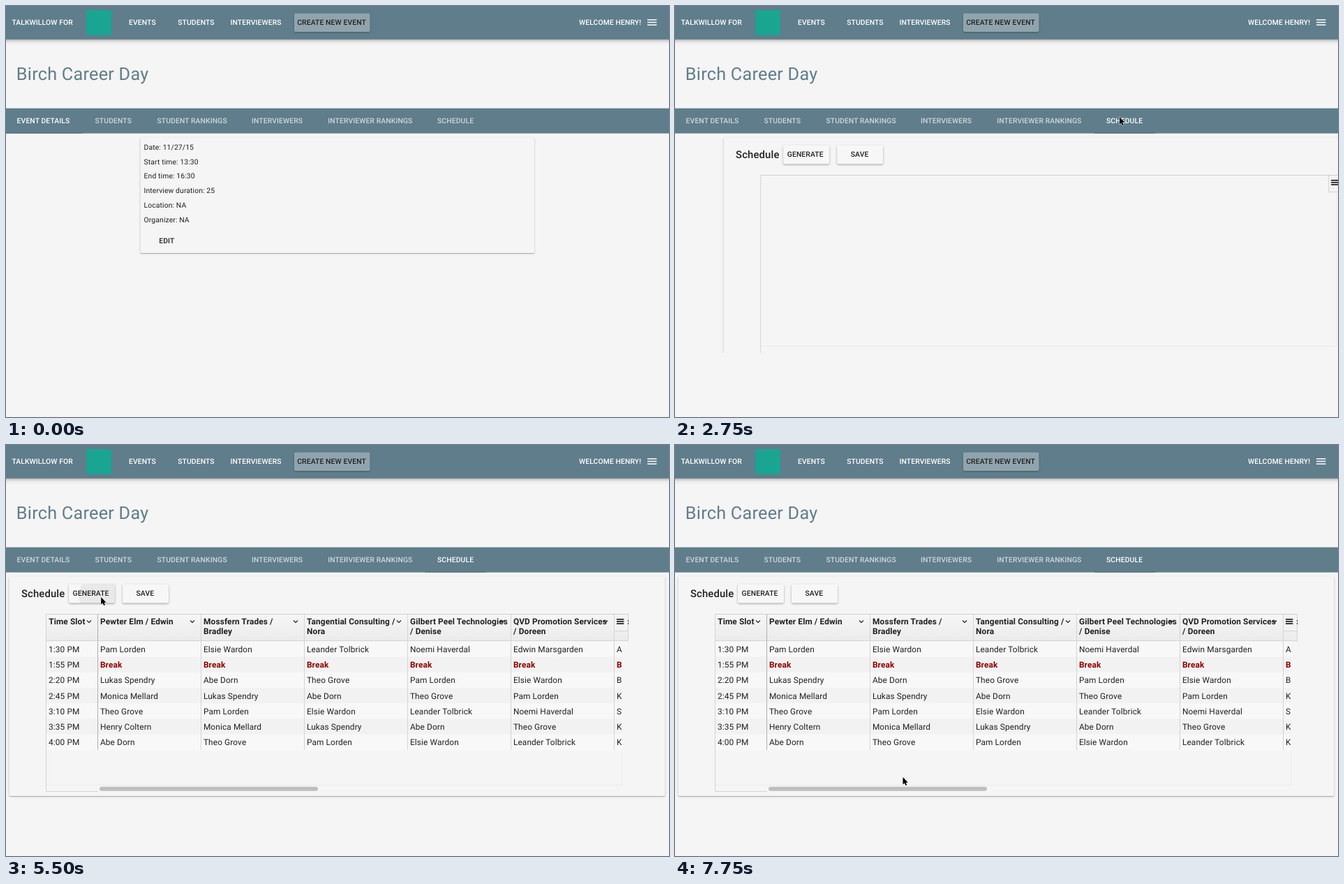
Recreate the animation shown at these times as an HTML page with a canvas. Size 950x589 px, loop 8 s.

```html
<!DOCTYPE html>
<html lang="en">
<head>
<meta charset="utf-8">
<title>Event schedule</title>
<style>
  html, body { margin: 0; width: 100%; height: 100%; overflow: hidden; background: #f5f5f5; }
  canvas { display: block; width: 950px; height: 589px; }
</style>
</head>
<body>
<canvas id="stage"></canvas>
<script>
const W = 950, H = 589, LOOP = 8000, STEP = 250;
const UNIT = W / 1280; // page was laid out 1280 px wide
const BG = '#f5f5f5', SLATE = '#607d8b', INK = '#212121', LINE = '#d4d4d4';
const SLIDE_AT = 2400, SLIDE_MS = 500, PRESS_AT = 5000, FILL_AT = 5500;

const canvas = document.getElementById('stage');
const ctx = canvas.getContext('2d');
const dpr = window.devicePixelRatio || 1;
canvas.width = W * dpr;
canvas.height = H * dpr;

const TABS = [
  ['EVENT DETAILS', 15.6], ['STUDENTS', 127.5], ['STUDENT RANKINGS', 216.4],
  ['INTERVIEWERS', 352], ['INTERVIEWER RANKINGS', 461.2], ['SCHEDULE', 618]
];
const DETAILS = ['Date: 11/27/15', 'Start time: 13:30', 'End time: 16:30',
  'Interview duration: 25', 'Location: NA', 'Organizer: NA'];

const HEADS = [
  ['Pewter Elm / Edwin'],
  ['Mossfern Trades /', 'Bradley'],
  ['Tangential Consulting /', 'Nora'],
  ['Gilbert Peel Technologies', '/ Denise'],
  ['QVD Promotion Services', '/ Doreen']
];
const PAM = 'Pam Lorden', ELSIE = 'Elsie Wardon', LEANDER = 'Leander Tolbrick',
  NOEMI = 'Noemi Haverdal', EDWIN = 'Edwin Marsgarden', LUKAS = 'Lukas Spendry',
  ABE = 'Abe Dorn', THEO = 'Theo Grove', MONICA = 'Monica Mellard', HENRY = 'Henry Coltern';
const BREAK = 'Break';
const ROWS = [
  ['1:30 PM', PAM, ELSIE, LEANDER, NOEMI, EDWIN, 'A'],
  ['1:55 PM', BREAK, BREAK, BREAK, BREAK, BREAK, BREAK],
  ['2:20 PM', LUKAS, ABE, THEO, PAM, ELSIE, 'B'],
  ['2:45 PM', MONICA, LUKAS, ABE, THEO, PAM, 'K'],
  ['3:10 PM', THEO, PAM, ELSIE, LEANDER, NOEMI, 'S'],
  ['3:35 PM', HENRY, MONICA, LUKAS, ABE, THEO, 'K'],
  ['4:00 PM', ABE, THEO, PAM, ELSIE, LEANDER, 'K']
];

// pointer path: time, x, y
const PATH = [
  [250, 125, 0], [750, 240, 110], [1250, 398, 198], [1750, 560, 178],
  [2000, 620, 163], [2250, 626.7, 162], [2500, 636, 158.5], [2750, 637, 159],
  [3000, 620, 158], [3250, 510, 152], [3500, 385.3, 149], [3750, 209, 163],
  [4000, 150, 208], [4250, 136, 219.5], [4500, 136.2, 218], [6750, 136.2, 218],
  [7000, 150, 235], [7250, 210, 320], [7500, 300, 440], [7750, 326.5, 476]
];

const clamp = v => Math.min(1, Math.max(0, v));
const mix = (a, b, k) => a + (b - a) * k;

// cubic-bezier(.35, 0, .25, 1)
function swift(x) {
  x = clamp(x);
  let lo = 0, hi = 1;
  for (let i = 0; i < 30; i++) {
    const s = (lo + hi) / 2, r = 1 - s;
    if (1.05 * r * r * s + 0.75 * r * s * s + s * s * s < x) lo = s; else hi = s;
  }
  return lo * lo * (3 - 2 * lo);
}

function rect(x, y, w, h, color) {
  ctx.fillStyle = color;
  ctx.fillRect(x, y, w, h);
}

function text(str, x, y, size = 14, weight = 400, color = INK) {
  ctx.font = `${weight} ${size * UNIT}px Roboto, sans-serif`;
  ctx.letterSpacing = `${size * UNIT * 0.01}px`;
  ctx.textRendering = 'geometricPrecision';
  ctx.fillStyle = color;
  ctx.fillText(str, x, y);
}

function raised(x, y, w, h, fill, alpha, blur, dy, radius = 0) {
  ctx.save();
  ctx.shadowColor = `rgba(0,0,0,${alpha})`;
  ctx.shadowBlur = blur * dpr;
  ctx.shadowOffsetY = dy * dpr;
  ctx.fillStyle = fill;
  ctx.beginPath();
  ctx.roundRect(x, y, w, h, radius);
  ctx.fill();
  ctx.restore();
}

// soft spread plus a tight line under the lower edge
function card(x, y, w, h) {
  raised(x, y, w, h, BG, 0.22, 2.6, 0.8, 1);
  raised(x, y, w, h, BG, 0.22, 0.8, 0.8, 1);
}

function clipped(x, y, w, h, paint) {
  ctx.save();
  ctx.beginPath();
  ctx.rect(x, y, w, h);
  ctx.clip();
  paint();
  ctx.restore();
}

function bars(x, y, w, h, gap, color) {
  for (let i = 0; i < 3; i++) rect(x, y + i * gap, w, h, color);
}

function header() {
  raised(-9, -9, W + 18, 56.4, SLATE, 0.2, 3, 1.5);
  raised(-9, -9, W + 18, 56.4, SLATE, 0.22, 6, 2.6);
  rect(115, 6, 36, 36, '#1aa593');
  raised(413, 10.5, 108.5, 26.5, '#90a4ae', 0.3, 2.6, 1, 2);
  const nav = (s, x, y = 27.2, color = '#fff') => text(s, x, y, 14, 500, color);
  nav('TALKWILLOW FOR', 8.4);
  nav('EVENTS', 176);
  nav('STUDENTS', 246.2);
  nav('INTERVIEWERS', 321.5);
  nav('CREATE NEW EVENT', 417.2, 27.2, INK);
  nav('WELCOME HENRY!', 821, 26.7);
  bars(919, 19, 13.4, 1.5, 3.7, '#fff');
  text('Birch Career Day', 14.8, 106, 34, 400, SLATE);
}

function tabs(t) {
  rect(0, 146.6, W, 36, SLATE);
  const active = t < SLIDE_AT ? 0 : 5;
  TABS.forEach(([s, x], i) =>
    text(s, x, 168.1, 14, 500, i === active ? '#fff' : '#cfd8dc'));
  const left = mix(0, 601, swift((t - SLIDE_AT) / 250));
  const right = mix(110, 688, swift((t - SLIDE_AT) / 125));
  rect(left, 181.1, right - left, 1.5, '#587481');
}

function details() {
  card(192.5, 188.5, 564.5, 165.5);
  DETAILS.forEach((s, i) => text(s, 197.6, 205.8 + i * 20.75));
  text('EDIT', 219.2, 340.4, 14, 500);
}

function button(label, x, tx, pressed) {
  raised(x, 199.6, 66, 26.8, pressed ? '#e2e2e2' : '#f7f7f7',
    pressed ? 0.5 : 0.36, pressed ? 4.5 : 2.8, pressed ? 1.8 : 1.2, 2);
  return () => text(label, tx, 216.2, 14, 500);
}

function ripple(t) {
  const age = t - PRESS_AT;
  if (age < 0 || age >= 750) return;
  const alpha = age < 500 ? 0.18 : 0.06;
  clipped(90, 199.6, 66, 26.8, () => {
    ctx.fillStyle = `rgba(0,0,0,${alpha})`;
    ctx.beginPath();
    ctx.arc(136.5, 216, 5 + age * 0.054, 0, Math.PI * 2);
    ctx.fill();
  });
}

function chevron(x) {
  ctx.strokeStyle = '#222';
  ctx.lineWidth = 1.2;
  ctx.beginPath();
  ctx.moveTo(x - 3, 251.5);
  ctx.lineTo(x, 254.5);
  ctx.lineTo(x + 3, 251.5);
  ctx.stroke();
}

function table() {
  const colX = i => i ? 131.3 + (i - 1) * 148 : 57.4;
  const rowH = 30 * UNIT, top = 281.2;
  const shade = ctx.createLinearGradient(0, 243, 0, 281);
  shade.addColorStop(0, '#f6f6f6');
  shade.addColorStop(1, '#ebebeb');
  rect(58, 243, 834, 38, shade);

  clipped(57, 281, 826, 157, () => {
    ROWS.forEach((row, r) => {
      const y = top + r * rowH;
      rect(58, y, 825, rowH, r % 2 ? '#f2f2f2' : '#f8f8f8');
      row.forEach((s, c) => {
        const rest = s === BREAK;
        text(s, colX(c) + 3.6, y + 15.6, 16, rest ? 700 : 400, rest ? '#8f0000' : INK);
      });
    });
  });

  text('Time Slot', 61.2, 257.4, 16, 700);
  chevron(119);
  HEADS.forEach((lines, i) => {
    lines.forEach((s, n) => text(s, colX(i + 1) + 3.8, 257.4 + n * 14, 16, 700));
    chevron(267 + i * 148);
  });
  rect(57, 280, 835, 1, LINE);
  for (let i = 1; i < 7; i++)
    rect(Math.floor(colX(i)), 243, 1, 194, i === 1 ? '#b0b0b0' : LINE);
  rect(891, 243, 1, 38, LINE);
  rect(891, 251, 1, 2, INK);
  rect(891, 255, 1, 2, INK);
  rect(57, 496, 75, 1, LINE);
  ctx.fillStyle = '#bfbfbf';
  ctx.beginPath();
  ctx.roundRect(134, 489.8, 313, 6, 3);
  ctx.fill();
}

function schedule(t) {
  card(4.5, 188.5, 940, 314.5);
  text('Schedule', 21.9, 217.5, 20, 500);
  const pressed = t >= PRESS_AT && t < PRESS_AT + 500;
  const labels = [button('GENERATE', 90, 95.6, pressed), button('SAVE', 167, 186.5, false)];
  ripple(t);
  labels.forEach(draw => draw());

  rect(57, 487, 826, 1, '#ebebeb');
  rect(882, 267, 1, 220, '#ebebeb');
  if (t >= FILL_AT) table();
  rect(57, 242, 835, 1, '#cfcfcf');
  rect(57, 242, 1, 255, LINE);
  rect(871, 243, 20, 24, LINE);
  rect(872, 243, 19, 23, '#f3f3f3');
  if (t < FILL_AT) rect(891, 243, 1, 24, LINE);
  bars(875, 249, 10.4, 1.6, 3.1, '#111');
}

function pointer(t) {
  if (t < PATH[0][0]) return;
  let i = PATH.length - 1;
  while (PATH[i][0] > t) i--;
  const a = PATH[i], b = PATH[i + 1] || a;
  const k = b === a ? 0 : (t - a[0]) / (b[0] - a[0]);
  ctx.save();
  ctx.translate(mix(a[1], b[1], k), mix(a[2], b[2], k));
  const arrow = new Path2D('M0 0V10.6L2.4 8.4L4 12.1L5.8 11.3L4.2 7.7H7.4Z');
  ctx.lineJoin = 'round';
  ctx.lineWidth = 1.2;
  ctx.strokeStyle = 'rgba(255,255,255,.7)';
  ctx.stroke(arrow);
  ctx.fillStyle = '#000';
  ctx.fill(arrow);
  ctx.restore();
}

function draw(t) {
  ctx.setTransform(dpr, 0, 0, dpr, 0, 0);
  rect(0, 0, W, H, BG);
  header();
  tabs(t);
  const p = swift((t - SLIDE_AT) / SLIDE_MS);
  clipped(0, 183, W, 177 + 147 * p, () => {
    ctx.translate(-W * p, 0);
    if (p < 1) details();
    ctx.translate(W, 0);
    if (p > 0) schedule(t);
  });
  pointer(t);
}

const start = performance.now();
function tick() {
  const t = (performance.now() - start) % LOOP;
  draw(Math.floor(t / STEP) * STEP);
  requestAnimationFrame(tick);
}
tick();
</script>
</body>
</html>
```
